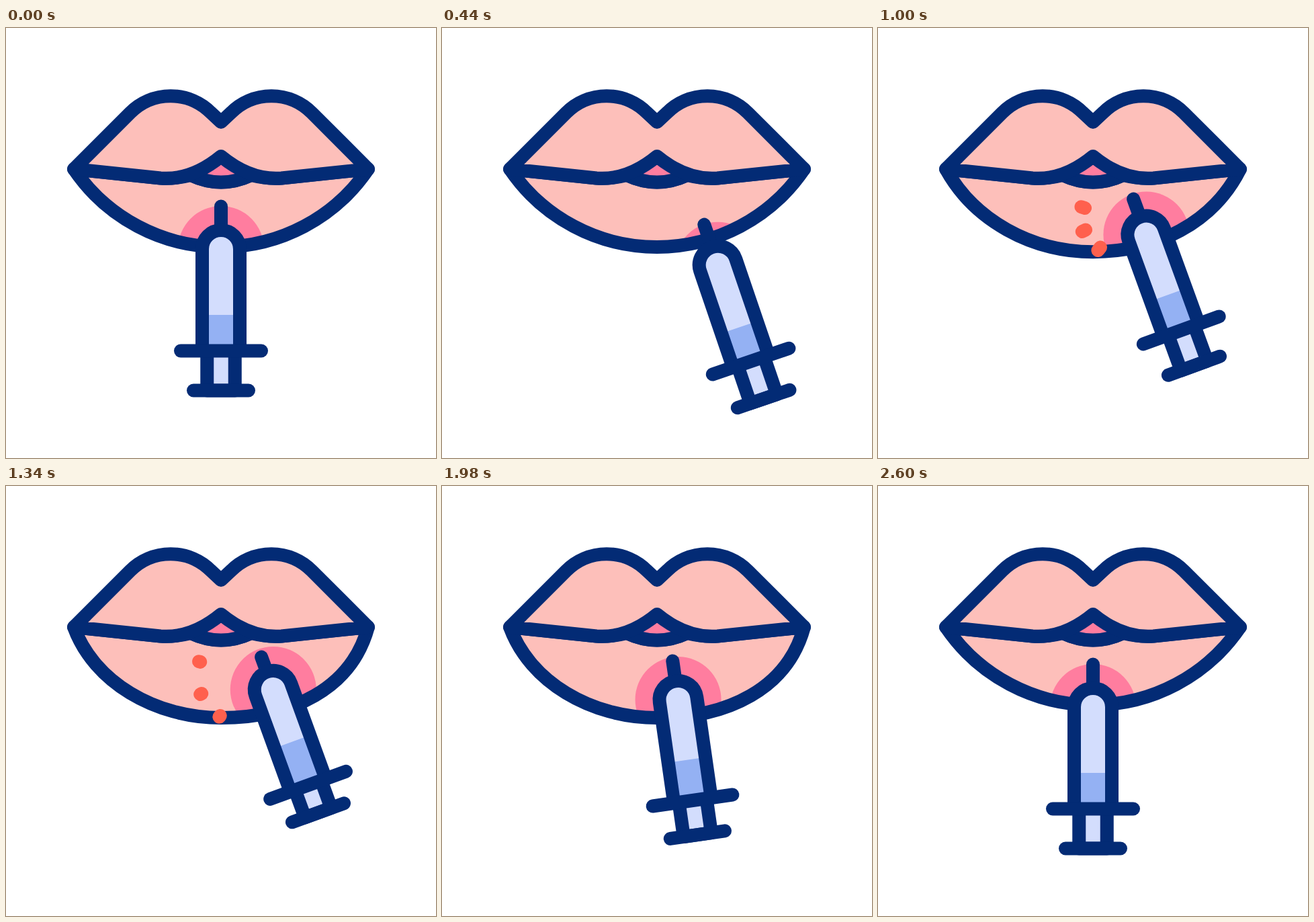
Recreate the animation shown at these times as an HTML page. Size 640x640 px, loop 3 s.

```html
<!DOCTYPE html>
<html lang="en">
<head>
<meta charset="utf-8">
<title>Lip injection</title>
<style>
  html, body { margin: 0; width: 100%; height: 100%; overflow: hidden; background: #fff; }
  svg { display: block; width: 100vw; height: 100vh; }
  .line { fill: none; stroke: #032b75; stroke-width: 20; stroke-linecap: round; stroke-linejoin: round; }
  .skin { fill: #fdbfba; }
  .pink { fill: #ff7d9f; }
  .glass { fill: #d3ddfd; }
  .fluid { fill: #94b1f3; }
  #sparks { fill: none; stroke: #ff604d; stroke-width: 20; stroke-linecap: round; }
</style>
</head>
<body>
<svg viewBox="0 0 640 640">
  <defs>
    <clipPath id="lowerClip"><path class="lower"/></clipPath>
  </defs>

  <path class="lower skin"/>
  <circle id="glow" class="pink" r="64" clip-path="url(#lowerClip)"/>
  <path class="lower line"/>
  <path class="pink" d="M275 220Q320 239 365 220L320 191Z"/>
  <path class="line" d="M275 219Q320 240 365 219"/>
  <path class="line skin" d="M101 210L185 126A85 85 0 0 1 305 126L320 140L335 126A85 85 0 0 1 455 126L539 210L410 223.5C378 226 348 214 320 191C292 214 262 226 230 223.5Z"/>

  <path id="sparks"/>

  <g id="syringe">
    <path id="needle" class="line"/>
    <path id="rod" class="line glass"/>
    <path class="glass" d="M-28 151V0A28 28 0 0 1 28 0V151Z"/>
    <path id="fluid" class="fluid"/>
    <path class="line" d="M-28 151V0A28 28 0 0 1 28 0V151"/>
    <path class="line" d="M-60 151.5H60"/>
    <path id="thumb" class="line"/>
  </g>
</svg>
<script>
const LOOP = 3000, TILT = 20, RAD = Math.PI / 180;
const el = id => document.getElementById(id);
const setPath = (id, d) => el(id).setAttribute('d', d);
const mix = (a, b, k) => a + (b - a) * k;

// Smooth 0..1 progress between two times
function ease(t, from, to) {
  const p = Math.min(1, Math.max(0, (t - from) / (to - from)));
  return p * p * (3 - 2 * p);
}

// Lower lip, flat (k = 0) to plumped (k = 1); the right half swells a little more
function lowerLip(k) {
  const bottom = mix(326, 345, k);
  const left = `${mix(150.3, 131, k)} ${mix(282.5, 292, k)} ${mix(232.3, 222, k)} ${bottom}`;
  const right = `${mix(407.7, 425, k)} ${bottom} ${mix(489.7, 514, k)} ${mix(282.5, 302, k)}`;
  return `M101 210C${left} 320 ${bottom}C${right} 539 210` +
         'L410 223.5Q390 225 365 219Q320 240 275 219Q250 225 230 223.5Z';
}

// Inner end and outward direction of each spark
const SPARKS = [[308, 268, -0.95, -0.31], [309, 300.5, -0.9, 0.43], [331, 326.5, -0.62, 0.78]];
const SPARK_LENGTH = 22;

function sparkPath(t) {
  const head = SPARK_LENGTH * ease(t, 900, 1200);
  const tail = SPARK_LENGTH * ease(t, 1100, 1400);
  if (head - tail < 0.05) return '';
  return SPARKS.map(([x, y, dx, dy]) =>
    `M${x + dx * tail} ${y + dy * tail}L${x + dx * head} ${y + dy * head}`).join('');
}

function draw(t) {
  const back = ease(t, 1700, 2200);
  const swing = ease(t, 100, 500) - back;
  const insert = ease(t, 500, 833);
  const press = ease(t, 833, 1500);

  const depth = 48.5 * insert + 7 * press;
  const push = 18 * press * (1 - back);
  const shrink = (6 * ease(t, 667, 833) + 7 * press) * (1 - back);
  const x = 320 + swing * (96.4 - depth * Math.sin(TILT * RAD));
  const y = 329 + swing * (25.2 - depth * Math.cos(TILT * RAD));

  const lip = lowerLip(ease(t, 833, 1233) - ease(t, 2200, 2600));
  document.querySelectorAll('.lower').forEach(path => path.setAttribute('d', lip));
  el('glow').setAttribute('cx', x);
  el('glow').setAttribute('cy', y);
  setPath('sparks', sparkPath(t));

  el('syringe').setAttribute('transform', `translate(${x} ${y}) rotate(${-TILT * swing})`);
  const end = 210.5 - push;
  setPath('needle', `M0 ${shrink - 63.5}V-28`);
  setPath('rod', `M-20.75 151V${end}H20.75V151`);
  setPath('thumb', `M-41 ${end}H41`);
  setPath('fluid', `M-28 ${98 - push}H28V151H-28Z`);
}

function tick() {
  draw(performance.now() % LOOP);
  requestAnimationFrame(tick);
}
tick();
</script>
</body>
</html>
```
